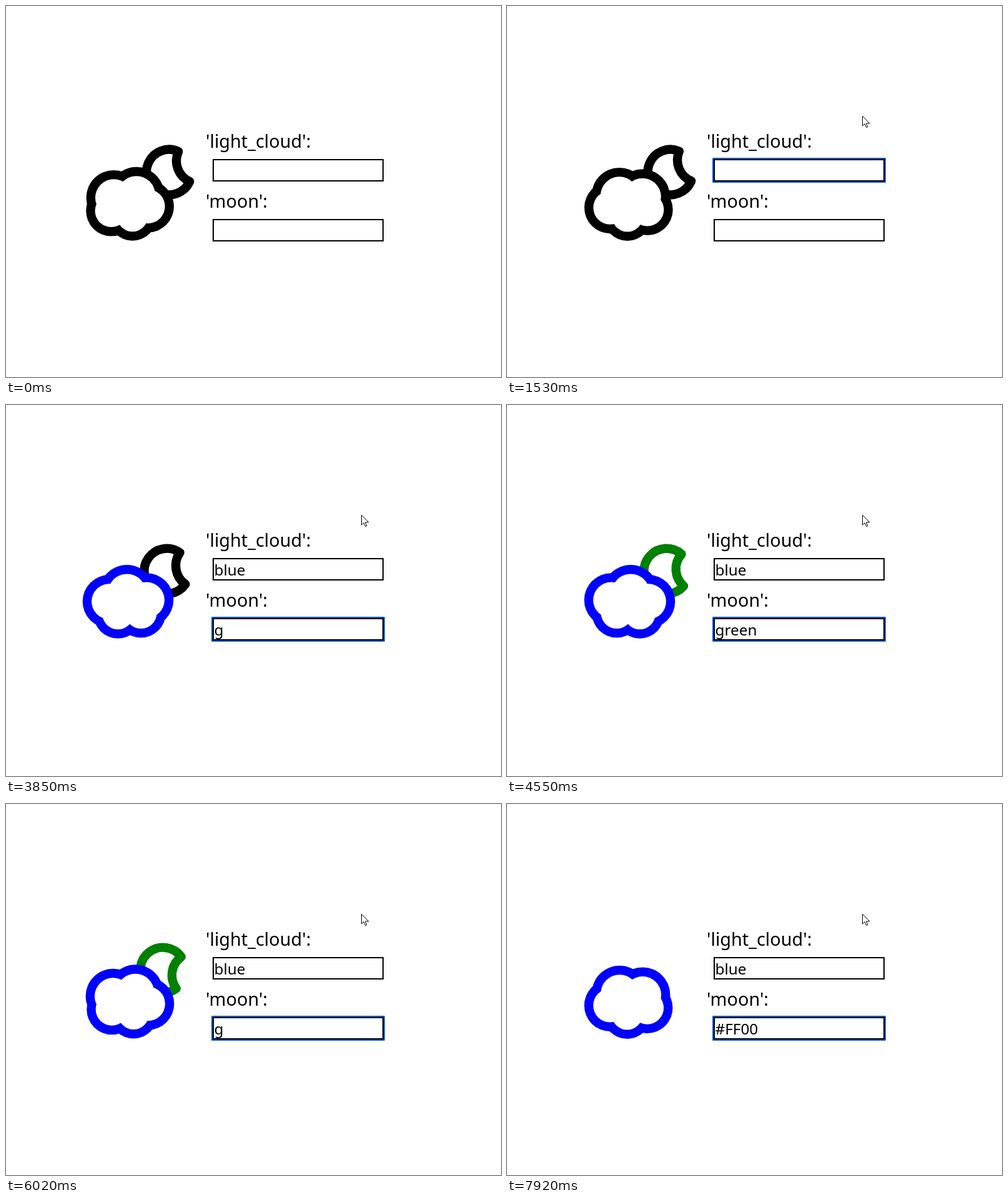
An HTML page with a canvas for the animation above (7.99 s loop, 793 px wide and 594 px high).

```html
<!DOCTYPE html>
<html lang="en">
<head>
<meta charset="utf-8">
<title>Weather icon colours</title>
<style>
  html, body { margin: 0; width: 100%; height: 100%; overflow: hidden; background: #fff; }
  canvas { display: block; }
</style>
</head>
<body>
<canvas id="stage" width="793" height="594"></canvas>
<script>
const ctx = document.getElementById('stage').getContext('2d');
const TAU = Math.PI * 2;
const LOOP = 7990, STEP = 70, TICK = 1000 / 15;
const ICON_START = 29000;      // icon clock at the start of the loop
const SIZE = 150, STROKE = 14.4;
const FONT = '"Noto Sans", "Open Sans", sans-serif';

// [time, text, icon colour]
const cloudStates = [
  [0, '', 'black'], [1810, 'b', 'black'], [1950, 'bl', 'black'],
  [2160, 'blu', 'black'], [2370, 'blue', 'blue']
];
const moonStates = [
  [0, '', 'black'], [3710, 'g', 'black'], [3920, 'gr', 'black'],
  [4060, 'gre', 'black'], [4200, 'gree', 'black'], [4410, 'green', 'green'],
  [5390, 'gree', 'green'], [5600, 'gre', 'green'], [5810, 'gr', 'green'],
  [6020, 'g', 'green'], [6230, '', 'black'], [6580, '#', 'black'],
  [7080, '#F', 'black'], [7220, '#FF', 'black'], [7430, '#FF0', '#FF0'],
  [7710, '#FF00', 'transparent']
];
const CLOUD_FOCUS = 700, MOON_FOCUS = 3010;

// [time, x, y] of the pointer tip
const pointerPath = [[70, 692, 528], [560, 500, 268], [830, 500, 268], [1190, 569.5, 176.5]];

const stateAt = (states, t) => states.filter(s => s[0] <= t).pop();

function puffs(turn, cx, cy, inset) {
  const rx = SIZE * 0.21, ry = SIZE * 0.12, rMin = SIZE * 0.24 - inset, grow = SIZE * 0.04;
  for (let i = 0; i < 5; i++) {
    const angle = (turn + i / 5) * TAU, c = Math.cos(angle), s = Math.sin(angle);
    ctx.beginPath();
    ctx.arc(cx - s * rx, cy + c * ry + grow / 2, rMin + (1 - c / 2) * grow, 0, TAU);
    ctx.fill();
  }
}

function drawCloud(time, cx, cy, color) {
  const turn = time / 30000;
  ctx.fillStyle = color;
  puffs(turn, cx, cy, 0);
  ctx.globalCompositeOperation = 'destination-out';
  ctx.fillStyle = 'black';
  puffs(turn, cx, cy, STROKE);
  ctx.globalCompositeOperation = 'source-over';
}

function drawMoon(time, cx, cy, color) {
  const r = SIZE * 0.29 - STROKE / 2;
  const swing = Math.cos(time / 15000 * TAU), tilt = -swing * TAU / 16;
  const x = cx + swing * SIZE * 0.05, offset = r * Math.SQRT2;
  ctx.strokeStyle = color;
  ctx.lineWidth = STROKE;
  ctx.lineCap = ctx.lineJoin = 'round';
  ctx.beginPath();
  ctx.arc(x, cy, r, tilt + TAU / 8, tilt + TAU * 7 / 8);
  ctx.arc(x + Math.cos(tilt) * offset, cy + Math.sin(tilt) * offset, r,
    tilt + TAU * 5 / 8, tilt + TAU * 3 / 8, true);
  ctx.closePath();
  ctx.stroke();
}

function text(value, x, y, size) {
  ctx.fillStyle = 'black';
  ctx.font = `${size}px ${FONT}`;
  ctx.fillText(value, x, y);
}

function drawField(label, value, y, focused) {
  text(label, 320, y - 18, 28.8);
  if (focused) {
    ctx.fillStyle = '#075ad0';
    ctx.beginPath();
    ctx.roundRect(329, y - 2, 278, 40, 1.5);
    ctx.fill();
  }
  ctx.fillStyle = 'black';
  ctx.fillRect(331, y, 274, 36);
  ctx.fillStyle = 'white';
  ctx.fillRect(333, y + 2, 270, 32);
  text(value, 333.5, y + 28, 24.3);
}

function drawPointer(t) {
  if (t < pointerPath[0][0]) return;
  const next = pointerPath.findIndex(p => p[0] > t);
  const [t1, x1, y1] = pointerPath.at(next < 0 ? -1 : next);
  const [t0, x0, y0] = pointerPath.at(next < 0 ? -1 : next - 1);
  const k = t1 > t0 ? (t - t0) / (t1 - t0) : 1;
  const ease = k * k * (3 - 2 * k);
  ctx.save();
  ctx.translate(x0 + (x1 - x0) * ease, y0 + (y1 - y0) * ease);
  ctx.fillStyle = 'white';
  ctx.strokeStyle = 'black';
  ctx.lineWidth = 1;
  ctx.lineJoin = 'miter';
  ctx.fill(arrow);
  ctx.stroke(arrow);
  ctx.restore();
}
const arrow = new Path2D('M0 0V15.5L3.6 12.2L6.2 18L8.4 17L5.9 11.4H11Z');

function draw() {
  const index = Math.floor((performance.now() % LOOP + 10) / STEP);
  const t = index * STEP, iconTime = ICON_START + index * TICK;
  const [, cloudText, cloudColor] = stateAt(cloudStates, t);
  const [, moonText, moonColor] = stateAt(moonStates, t);
  ctx.clearRect(0, 0, 793, 594);
  drawMoon(iconTime, 254.4, 266, moonColor);
  drawCloud(iconTime, 196, 316, cloudColor);
  drawField("'light_cloud':", cloudText, 245, t >= CLOUD_FOCUS && t < MOON_FOCUS);
  drawField("'moon':", moonText, 341, t >= MOON_FOCUS);
  drawPointer(t);
  requestAnimationFrame(draw);
}
draw();
</script>
</body>
</html>
```
